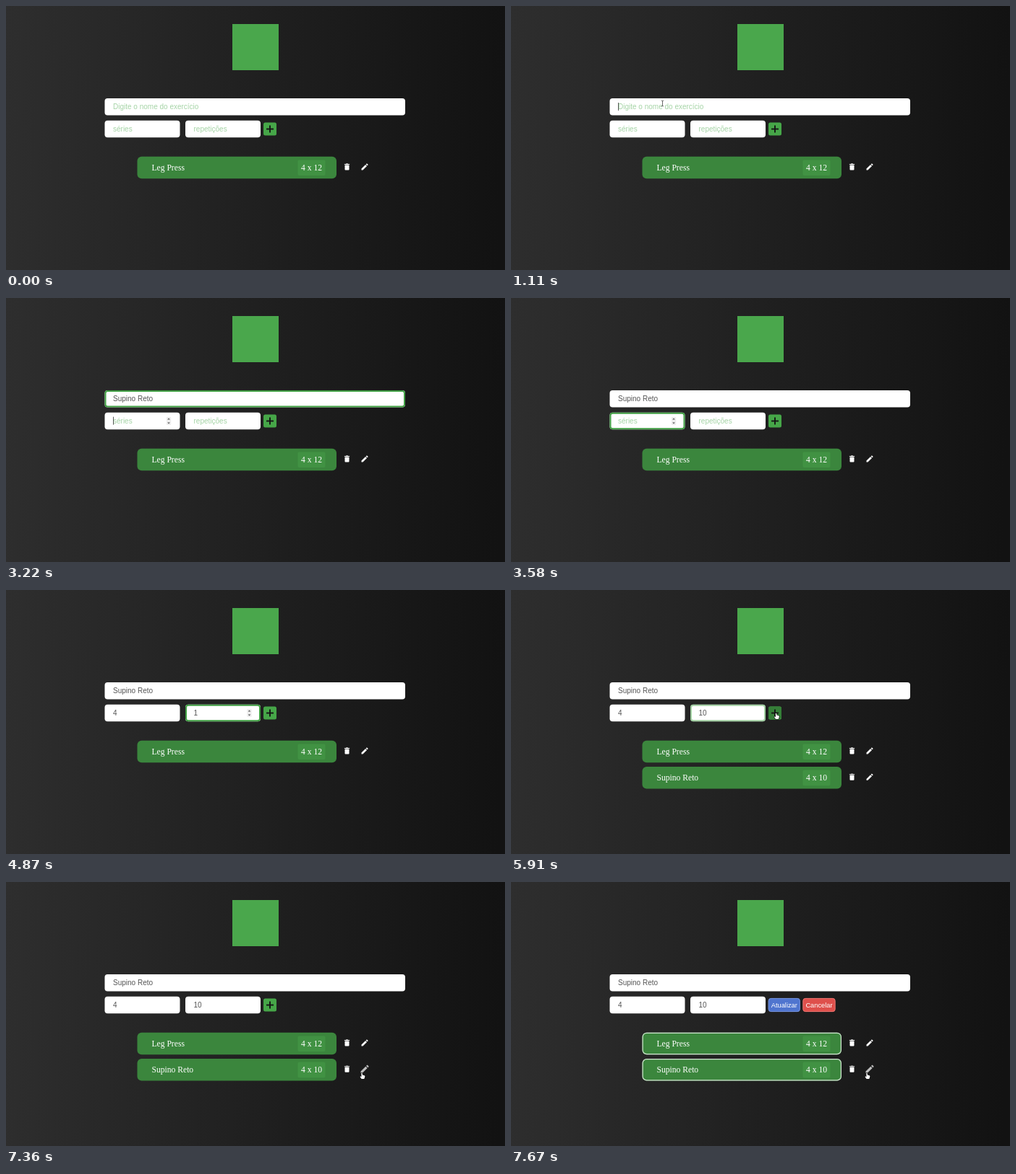
Recreate the animation shown at these times as an HTML page with a canvas. Size 690x366 px, loop 8000 ms.

```html
<!DOCTYPE html>
<html lang="pt">
<head>
<meta charset="utf-8">
<title>Treino</title>
<style>
html, body { margin: 0; width: 100%; height: 100%; overflow: hidden; background: #1e1e1e; }
canvas { display: block; }
</style>
</head>
<body>
<canvas id="stage" width="690" height="366"></canvas>
<script>
const ctx = document.getElementById('stage').getContext('2d');
const LOOP = 8000;
const SANS = '"Liberation Sans", Arial, sans-serif';
const SERIF = '"Liberation Serif", Times, serif';
const GREEN = '#46a648';

const clamp = v => Math.max(0, Math.min(1, v));
const ramp = (t, start, length = 200) => clamp((t - start) / length);
const pulse = (t, on, off) => ramp(t, on) * (1 - ramp(t, off));
const within = (t, a, b) => t >= a && t < b;
const inside = (x, y, b) => x >= b.x && x <= b.x + b.w && y >= b.y && y <= b.y + b.h;

const nameField = { x: 136.5, y: 128, w: 415.5, h: 23.5, hint: 'Digite o nome do exercício', on: 1110, off: 3220 };
const setsField = { x: 136.5, y: 158.7, w: 104, h: 23.5, hint: 'séries', on: 3220, off: 4070, spin: true };
const repsField = { x: 248, y: 158.7, w: 104, h: 23.5, hint: 'repetições', on: 4070, off: 5810, spin: true };
const fields = [nameField, setsField, repsField];
const addButton = { x: 356, y: 161.5, w: 18, h: 18 };
const editIcon = { x: 488, y: 252, w: 16, h: 18 };

// Each entry: time of a key press, length of the text after it
const nameKeys = [[1750, 1], [1860, 2], [2020, 3], [2130, 4], [2240, 5], [2350, 6], [2460, 7], [2730, 8], [2790, 9], [2840, 10], [2890, 11]];
const setsKeys = [[3850, 1]];
const repsKeys = [[4390, 1], [5090, 2]];

function typed(text, keys, t) {
  let n = 0;
  for (const [at, len] of keys) if (t >= at) n = len;
  return text.slice(0, n);
}

// Pointer path: time, x, y
const path = [
  [160, 452, 61], [470, 211.5, 131], [630, 211.5, 131], [730, 209.5, 135],
  [5360, 214, 146], [5720, 366.5, 171], [5960, 366.5, 171], [6060, 386, 178],
  [6260, 553, 210], [6810, 553, 210], [7110, 474, 269], [7360, 492, 265]
];

function pointer(t) {
  if (t < 160 || within(t, 2080, 5360)) return null;
  let i = 0;
  while (i < path.length - 1 && t >= path[i + 1][0]) i++;
  const a = path[i], b = path[i + 1];
  if (!b || a[0] === 730) return { x: a[1], y: a[2] };
  const u = ramp(t, a[0], b[0] - a[0]);
  const k = u * u * (3 - 2 * u);
  return { x: a[1] + (b[1] - a[1]) * k, y: a[2] + (b[2] - a[2]) * k };
}

function box(x, y, w, h, r, fill) {
  ctx.beginPath();
  ctx.roundRect(x, y, w, h, r);
  ctx.fillStyle = fill;
  ctx.fill();
}

function outline(x, y, w, h, r, color, width) {
  ctx.beginPath();
  ctx.roundRect(x + width / 2, y + width / 2, w - width, h - width, r);
  ctx.strokeStyle = color;
  ctx.lineWidth = width;
  ctx.stroke();
}

function label(text, x, y, size, family, color, align = 'left') {
  ctx.font = `${size}px ${family}`;
  ctx.fillStyle = color;
  ctx.textAlign = align;
  ctx.fillText(text, x, y);
}

function poly(points, fill, stroke, width) {
  ctx.beginPath();
  for (let i = 0; i < points.length; i += 2) ctx.lineTo(points[i], points[i + 1]);
  ctx.closePath();
  if (stroke) {
    ctx.strokeStyle = stroke;
    ctx.lineWidth = width;
    ctx.lineJoin = 'round';
    ctx.stroke();
  }
  ctx.fillStyle = fill;
  ctx.fill();
}

function at(x, y, scale, draw) {
  ctx.save();
  ctx.translate(x, y);
  ctx.scale(scale, scale);
  draw();
  ctx.restore();
}

function backdrop() {
  const g = ctx.createLinearGradient(0, 0, 690, 20);
  g.addColorStop(0, '#2e2e2e');
  g.addColorStop(0.5, '#202020');
  g.addColorStop(1, '#121212');
  ctx.fillStyle = g;
  ctx.fillRect(0, 0, 690, 366);
}

function field(f, text, caret, t) {
  const focus = pulse(t, f.on, f.off);
  const base = f.y + 15;
  box(f.x, f.y, f.w, f.h, 4, '#fff');
  if (focus > 0) {
    ctx.globalAlpha = focus;
    outline(f.x, f.y, f.w, f.h, 3, '#41a044', 2);
    ctx.globalAlpha = 1;
  }
  label(text || f.hint, f.x + 11.5, base, 10, SANS, text ? '#555' : '#a5d4a6');
  if (caret) {
    const cx = f.x + 11.5 + (text ? ctx.measureText(text).width : 0);
    ctx.fillStyle = '#333';
    ctx.fillRect(Math.round(cx), base - 9, 0.8, 11);
  }
  if (f.spin && within(t, f.on, f.off)) {
    const cx = f.x + 88.5, cy = f.y + 11.8;
    box(cx - 3.2, cy - 5.5, 6.4, 11, 1, '#eee');
    poly([cx - 1.8, cy - 2, cx, cy - 4, cx + 1.8, cy - 2], '#555');
    poly([cx - 1.8, cy + 2, cx, cy + 4, cx + 1.8, cy + 2], '#555');
  }
}

function addControl(t) {
  const b = addButton;
  box(b.x, b.y, b.w, b.h, 2.5, GREEN);
  ctx.globalAlpha = pulse(t, 5650, 6050);
  box(b.x, b.y, b.w, b.h, 2.5, '#357f38');
  ctx.globalAlpha = 1;
  ctx.fillStyle = '#161616';
  ctx.fillRect(360, 169.6, 10, 1.9);
  ctx.fillRect(364.05, 165.5, 1.9, 10);
}

function textButton(text, x, w, fill, edge) {
  box(x, 161, w, 19, 4, fill);
  outline(x, 161, w, 19, 3.5, edge, 0.8);
  label(text, x + w / 2, 173.8, 9.3, SANS, '#fff', 'center');
}

function trash(x, y) {
  at(x, y, 1, () => {
    box(-3, -2.6, 6, 7, 0.9, '#fff');
    ctx.fillRect(-3.6, -4, 7.2, 1);
    ctx.fillRect(-1.4, -4.6, 2.8, 0.9);
  });
}

function pencil(x, y, hover) {
  const tone = Math.round(255 - 65 * hover);
  const fill = `rgb(${tone},${tone},${tone})`;
  at(x, y, 1 + 0.22 * hover, () => {
    poly([-4.5, 4.5, -4.5, 2.6, 1.1, -3, 3, -1.1, -2.6, 4.5], fill);
    poly([1.7, -3.6, 2.6, -4.5, 3.2, -4.5, 4.5, -3.2, 4.5, -2.6, 3.6, -1.7], fill);
  });
}

function row(name, count, y, edge, hover) {
  box(181.5, y, 275.5, 30.5, 6, '#3b863d');
  box(403.5, y + 4.7, 38, 21.5, 2, '#419243');
  if (edge > 0) {
    ctx.globalAlpha = edge;
    outline(181.5, y, 275.5, 30.5, 5.5, '#d3e7d3', 1.2);
    ctx.globalAlpha = 1;
  }
  label(name, 201.5, y + 19.4, 11.6, SERIF, '#fff');
  label(count, 422.5, y + 19.4, 11.6, SERIF, '#fff', 'center');
  trash(471.5, y + 14.3);
  pencil(496, y + 14.3, hover);
}

function ibeam() {
  ctx.strokeStyle = '#444';
  ctx.lineWidth = 0.8;
  ctx.beginPath();
  for (const s of [-1, 1]) {
    ctx.moveTo(-1.6, 4 * s);
    ctx.lineTo(0, 3.3 * s);
    ctx.lineTo(1.6, 4 * s);
  }
  ctx.moveTo(0, -3.3);
  ctx.lineTo(0, 3.3);
  ctx.stroke();
}

function arrow() {
  poly([0, 0, 0, 8.5, 2, 6.8, 3.3, 9.8, 4.7, 9.2, 3.4, 6.3, 6, 6.2], '#000', '#fff', 1.3);
}

function hand() {
  poly([-0.7, 0, 0.6, 0, 0.9, 2.6, 2.2, 2.8, 3.6, 3.3, 4.4, 4, 4, 6.2, 3.2, 8, -0.4, 8,
    -2.4, 5.2, -2, 4.3, -0.5, 5], '#fff', '#111', 1.2);
}

function cursor(t) {
  const p = pointer(t);
  if (!p) return;
  let shape = arrow;
  if (fields.some(f => inside(p.x, p.y, f))) shape = ibeam;
  else if (inside(p.x, p.y, addButton) || inside(p.x, p.y, editIcon)) shape = hand;
  at(p.x, p.y, 1, shape);
}

function render(t) {
  backdrop();
  ctx.fillStyle = '#4aa74c';
  ctx.fillRect(313, 25, 64, 64);

  const nameCaret = within(t, 1110, 3220);
  const setsCaret = within(t, 3220, 3580) || within(t, 3850, 4070);
  const repsCaret = within(t, 4070, 4870) || within(t, 5090, 5590);
  field(nameField, typed('Supino Reto', nameKeys, t), nameCaret, t);
  field(setsField, typed('4', setsKeys, t), setsCaret, t);
  field(repsField, typed('10', repsKeys, t), repsCaret, t);

  if (t < 7520) addControl(t);
  else {
    textButton('Atualizar', 355.8, 44, '#5075cf', '#7f9be0');
    textButton('Cancelar', 403.5, 45, '#df504c', '#ee7f7b');
  }

  const edge = ramp(t, 7500, 150);
  row('Leg Press', '4 x 12', 208.7, edge, 0);
  if (t >= 5860) row('Supino Reto', '4 x 10', 245, edge, ramp(t, 7200, 150));
  cursor(t);
}

const begin = performance.now();
function tick() {
  render((performance.now() - begin) % LOOP);
  requestAnimationFrame(tick);
}
tick();
</script>
</body>
</html>
```
